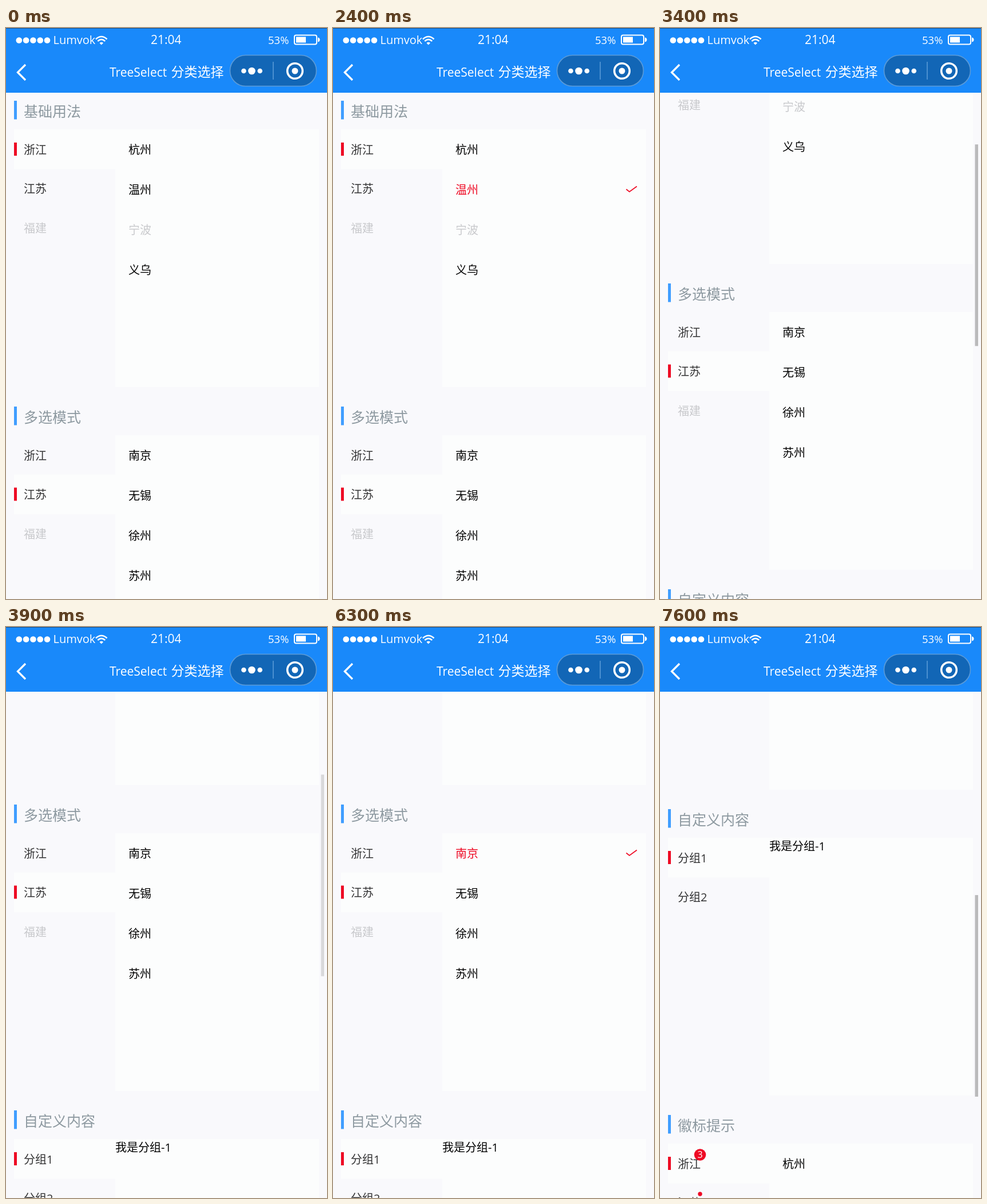
An HTML page that plays this animation: 561x997 px, repeating every 8 s.

```html
<!DOCTYPE html>
<html lang="zh-CN">
<head>
<meta charset="utf-8">
<title>TreeSelect</title>
<style>
  html, body { margin: 0; width: 100%; height: 100%; overflow: hidden; background: #f9f9fc; }
  svg { display: block; width: 561px; height: 997px; }
  text { font: 400 20px "Open Sans", "Noto Sans CJK SC", "Noto Sans CJK", sans-serif; }
  .title { font-size: 25px; fill: #8d99a0; }
  .side { fill: #323233; }
  .option { fill: #000; }
  .off { fill: #c8c9cc; }
  .on { fill: #ee0a24; }
  .check { fill: none; stroke: #ee0a24; stroke-width: 1.7; }
  .badge { font-size: 16px; fill: #fff; text-anchor: middle; }
  .bar { fill: #fff; }
  .line { fill: none; stroke: #fff; }
</style>
</head>
<body>
<svg viewBox="0 0 561 997">
  <rect width="561" height="997" fill="#f9f9fc"/>
  <g id="page"></g>
  <rect id="thumb" x="550.5" width="5.5" height="352" fill="#bababb"/>

  <g id="header">
    <rect width="561" height="113" fill="#1989fa"/>
    <rect width="561" height="1" fill="#1d4d80"/>
    <g id="signal" class="bar"></g>
    <text class="bar" x="82.500" y="27.500">Lumvok</text>
    <g class="line" stroke-width="2.600">
      <path d="M157 19.500Q166.700 10.500 176.500 19.500M160.300 23Q166.700 17 173.200 23"/>
      <path d="M163.500 26.200Q166.700 23.400 170 26.200L166.700 29.500Z" fill="#fff" stroke="none"/>
    </g>
    <text class="bar" x="253" y="27.500" style="font-size:21px">21:04</text>
    <text class="bar" x="458" y="28" style="font-size:18.500px">53%</text>
    <rect class="line" x="504" y="12.500" width="39" height="16" rx="3" stroke-width="2"/>
    <rect class="bar" x="507" y="15.500" width="17" height="10"/>
    <path class="bar" d="M545 16.500Q548.500 17 548.500 20.500T545 24.500Z"/>

    <path class="line" d="M34 64L20.500 77.500L34 91" stroke-width="3.300"/>
    <text class="bar" x="181" y="84.500" style="font-size:21px">TreeSelect</text>
    <text class="bar" x="288.500" y="85" style="font-size:23px">分类选择</text>
    <rect x="391.500" y="47.500" width="151" height="54" rx="27" fill="#1266b6" stroke="#5b9bd8" stroke-width="1.600"/>
    <path d="M467 59V90" stroke="#5b9bd8" stroke-width="1.600"/>
    <g class="bar">
      <circle cx="415.500" cy="75" r="4.300"/>
      <circle cx="429.500" cy="75" r="6.300"/>
      <circle cx="443.800" cy="75" r="4.300"/>
      <circle cx="505" cy="75" r="5.500"/>
    </g>
    <circle class="line" cx="505" cy="75" r="13.300" stroke-width="3.600"/>
  </g>
</svg>
<script>
const LOOP = 8000;
const SECTION = 534;
const ZHEJIANG = ['杭州', '温州', '宁波', '义乌'];
const JIANGSU = ['南京', '无锡', '徐州', '苏州'];
const REGIONS = ['浙江', '江苏', '福建'];
const DISABLED = ['福建', '宁波'];

// Each track is a list of [start time, value] with hard changes.
const tracks = {
  scroll: [[0, 0], [3300, 52.5], [3400, 215], [3500, 351], [7400, 380.5], [7500, 650], [7600, 877]],
  thumb: [[0, 0], [3300, 1], [3900, 0.5], [4000, 0], [7400, 1]],
  region: [[0, 0], [700, 1], [1200, 0]],
  single: [[0, []], [1800, ['杭州']], [2400, ['温州']], [3000, []]],
  multi: [[0, []], [4200, ['南京']], [4700, ['南京', '无锡']], [6300, ['南京']], [6900, []]]
};

const byId = id => document.getElementById(id);
const at = (track, t) => track.filter(step => step[0] <= t).pop()[1];
const rect = (x, y, w, h, fill) =>
  `<rect x="${x}" y="${y}" width="${w}" height="${h}" fill="${fill}"/>`;
const label = (x, y, text, cls) => `<text x="${x}" y="${y}" class="${cls}">${text}</text>`;
const dot = (x, y, r, fill) => `<circle cx="${x}" cy="${y}" r="${r}" fill="${fill}"/>`;

function sideItem(name, i, active, top) {
  const y = top + i * 68.5;
  const mark = i === active
    ? rect(14, y, 177, 69.5, '#fcfdfd') + rect(14, y + 23, 5, 23, '#ee0a24') : '';
  return mark + label(31, y + 42.5, name, DISABLED.includes(name) ? 'off' : 'side');
}

function option(name, i, chosen, top) {
  const y = top + 35.5 + i * 70;
  const on = chosen.includes(name);
  const cls = on ? 'on' : DISABLED.includes(name) ? 'off' : 'option';
  const check = on ? `<path class="check" d="M512.500 ${y - 1}L518 ${y + 3.5}L531 ${y - 6}"/>` : '';
  return label(214, y + 7.5, name, cls) + check;
}

function section(i, title, side, active, options, chosen = [], extra = () => '') {
  const top = 177 + i * SECTION;
  return rect(14, top - 50, 5, 32.5, '#409eff') +
    label(31, top - 22.5, title, 'title') +
    rect(191, top, 356, 450, '#fcfdfd') +
    side.map((name, k) => sideItem(name, k, active, top)).join('') +
    options.map((name, k) => option(name, k, chosen, top)).join('') +
    extra(top);
}

const groupText = top => label(191, top + 21.5, '我是分组-1', 'option');
const badges = top => dot(70, top + 19.5, 10.3, '#ee0a24') +
  label(70, top + 25.3, '3', 'badge') + dot(70, top + 88, 3.7, '#ee0a24');

function drawPage(s) {
  return section(0, '基础用法', REGIONS, s.region, s.region ? JIANGSU : ZHEJIANG, s.single) +
    section(1, '多选模式', REGIONS, 1, JIANGSU, s.multi) +
    section(2, '自定义内容', ['分组1', '分组2'], 0, [], [], groupText) +
    section(3, '徽标提示', REGIONS, 0, ZHEJIANG, [], badges);
}

byId('signal').innerHTML = [0, 1, 2, 3, 4].map(i => dot(22.8 + i * 12.3, 21.5, 5.3, '#fff')).join('');

let shown = '';
function render(t) {
  const s = {};
  for (const name in tracks) s[name] = at(tracks[name], t);
  const key = JSON.stringify(s);
  if (key === shown) return;
  shown = key;
  byId('page').innerHTML = drawPage(s);
  byId('page').setAttribute('transform', `translate(0 ${-s.scroll})`);
  byId('thumb').setAttribute('y', 117.3 + s.scroll * 0.4);
  byId('thumb').setAttribute('opacity', s.thumb);
}

const start = performance.now();
function tick() {
  render((performance.now() - start) % LOOP);
  requestAnimationFrame(tick);
}
tick();
</script>
</body>
</html>
```
